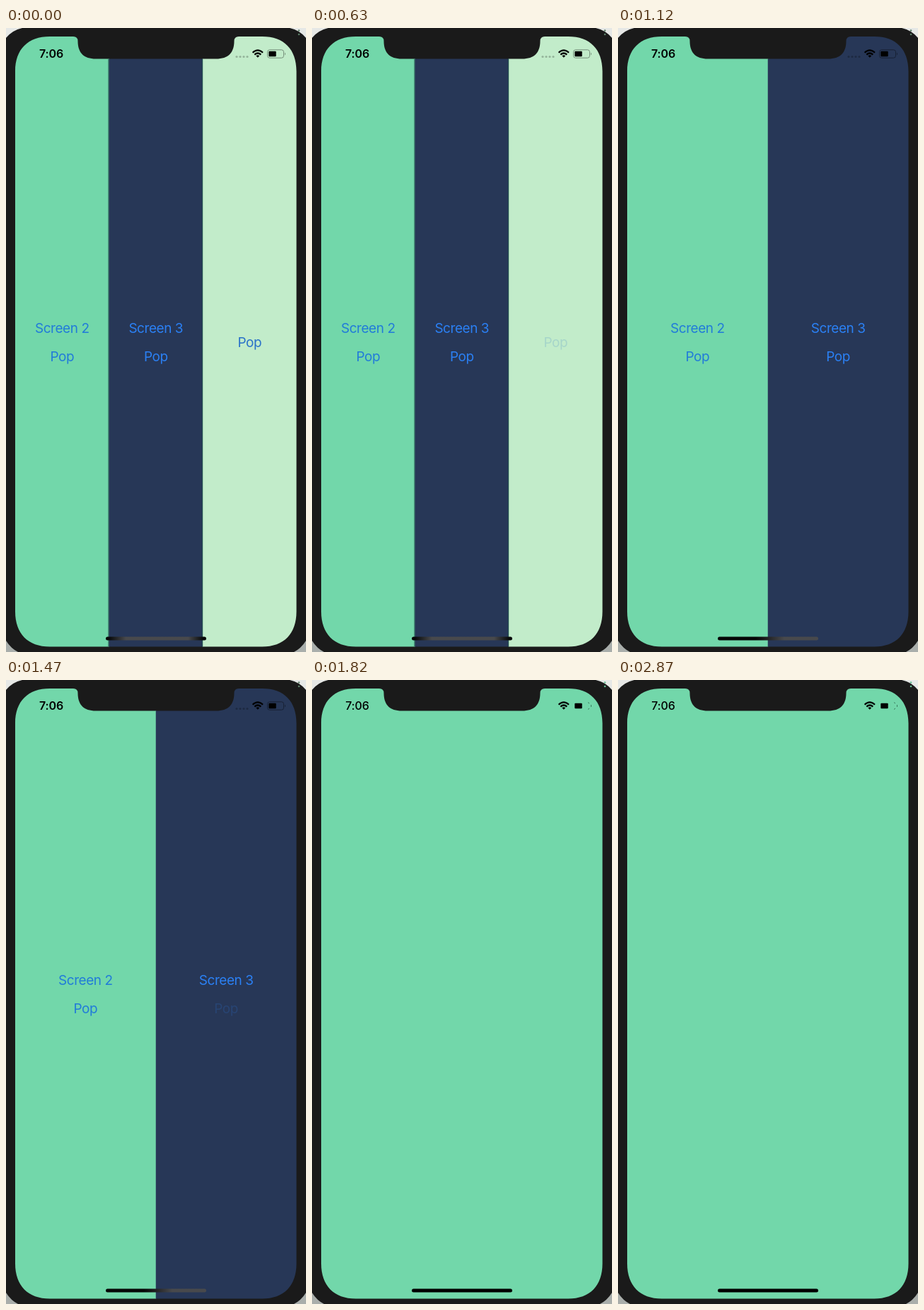
An HTML page that plays this animation: 424 by 880 pixels, repeating every 3080 ms.

```html
<!DOCTYPE html>
<html lang="en">
<head>
<meta charset="utf-8">
<title>Split screens</title>
<style>
  html, body { margin: 0; width: 100%; height: 100%; overflow: hidden; background: #1a1a1a; }
  svg { display: block; width: 424px; height: 880px; }
  text { font-family: Inter, "Liberation Sans", sans-serif; text-anchor: middle; }
  .link { font-size: 19px; letter-spacing: -.45px; }
  #clock { font-size: 16px; letter-spacing: -.1px; }
</style>
</head>
<body>
<svg viewBox="0 0 424 880">
  <defs>
    <clipPath id="screen">
      <path d="M13 61C13 30 31 12 62 12H95Q101.500 12 101.500 18.500C101.500 35 110 43.500 127 43.500H297C314 43.500 322.500 35 322.500 18.500Q322.500 12 329 12H362C393 12 410.500 30 410.500 61V823C410.500 854 393 872.500 362 872.500H62C31 872.500 13 854 13 823Z"/>
    </clipPath>
    <linearGradient id="bar3">
      <stop offset=".03" stop-color="#060808"/><stop offset=".2" stop-color="#48494c"/>
      <stop offset=".82" stop-color="#48494c"/><stop offset=".97" stop-color="#060808"/>
    </linearGradient>
    <linearGradient id="bar2">
      <stop offset=".38" stop-color="#050606"/><stop offset=".66" stop-color="#48494c"/>
    </linearGradient>
    <linearGradient id="bar1"><stop stop-color="#000"/></linearGradient>
  </defs>
  <rect width="424" height="880" fill="#1a1a1a"/>
  <path d="M0 0H23Q9 3 0 14ZM424 0H401Q415 3 424 14Z" fill="#e6e8e6"/>
  <path d="M0 864Q7 875 17 880H0ZM424 864Q417 875 407 880H424Z" fill="#a9aeab"/>
  <g id="menu"><circle cx="414" cy="3.500" r="1.300"/><circle cx="414" cy="9" r="1.300"/></g>
  <g id="panes" clip-path="url(#screen)"></g>
  <text id="clock" x="64" y="42">7:06</text>
  <g id="signal" opacity=".23">
    <circle cx="326" cy="40.500" r="1.600"/><circle cx="331" cy="40.500" r="1.600"/>
    <circle cx="336" cy="40.500" r="1.600"/><circle cx="341" cy="40.500" r="1.600"/>
  </g>
  <g fill="none" stroke="#000" stroke-width="2.200">
    <path d="M348.600 34.800Q355.800 28 363 34.800M351.300 37.600Q355.800 33.400 360.300 37.600"/>
    <path d="M353.400 39.300Q355.800 37.200 358.200 39.300L355.800 41.800Z" fill="#000" stroke="none"/>
  </g>
  <rect x="371.300" y="32.800" width="10.400" height="7.400" rx="1"/>
  <g id="shell" opacity=".4">
    <rect x="369.500" y="30.800" width="23" height="11.400" rx="3" fill="none" stroke="#000"/>
    <path d="M394 34.500Q396 36.500 394 38.500Z"/>
  </g>
  <path id="specks" d="M390 31.500l2 1.500M390 41.500l2-1.500M394.500 35v3" stroke="#2c664d" stroke-width=".8"/>
  <rect id="bar" x="141" y="858.600" width="142" height="5" rx="2.500"/>
</svg>
<script>
const LOOP = 3080, LEFT = 13, WIDTH = 397.500;
const POPS = [700, 1540];           // moments when the last pane is removed
const PRESS = 280, FADE = 150;      // press lead time and dimming duration
const PANES = [
  { fill: '#72d7aa', ink: '#217bd9', links: ['Screen 2', 'Pop'] },
  { fill: '#273757', ink: '#2b80f4', links: ['Screen 3', 'Pop'] },
  { fill: '#c2ecca', ink: '#2a72c9', links: ['Pop'] }
];
const $ = id => document.getElementById(id);
const easeInOut = p => p < .5 ? 2 * p * p : 1 - 2 * (1 - p) ** 2;
let shown = 0;

function paneMarkup(pane, i, count) {
  const w = WIDTH / count, x = LEFT + i * w;
  const firstY = 449.500 - (pane.links.length - 1) * 20;
  const edge = count === 3 && i
    ? `<rect x="${x - 1}" y="12" width="1.200" height="861" fill="#245052"/>` : '';
  const links = count === 1 ? '' : pane.links.map((label, k) =>
    `<text class="link" x="${x + w / 2}" y="${firstY + k * 40}" fill="${pane.ink}">${label}</text>`).join('');
  return `<rect x="${x}" y="12" width="${w + .5}" height="861" fill="${pane.fill}"/>${edge}${links}`;
}

function layout(count) {
  const single = count === 1;
  $('panes').innerHTML = PANES.slice(0, count).map((p, i) => paneMarkup(p, i, count)).join('');
  $('bar').setAttribute('fill', `url(#bar${count})`);
  if (single) $('bar').setAttribute('fill', '#000');
  $('clock').setAttribute('font-weight', single ? 500 : 600);
  $('signal').style.display = $('shell').style.display = single ? 'none' : '';
  $('specks').style.display = single ? '' : 'none';
  $('menu').setAttribute('fill', single ? '#62b991' : '#5d8069');
  shown = count;
}

function draw() {
  const t = performance.now() % LOOP;
  const done = POPS.filter(p => t >= p).length;
  if (shown !== 3 - done) layout(3 - done);
  if (done < POPS.length) {
    const p = Math.min(1, Math.max(0, (t - POPS[done] + PRESS) / FADE));
    $('panes').lastElementChild.setAttribute('opacity', 1 - .82 * easeInOut(p));
  }
  requestAnimationFrame(draw);
}
draw();
</script>
</body>
</html>
```
